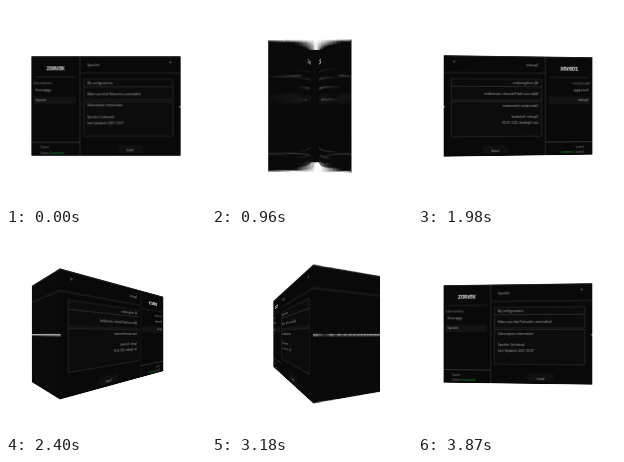
These frames come from a looping animation (200x200 px, 3900 ms). An HTML page:

```html
<!DOCTYPE html>
<html lang="en">
<head>
<meta charset="utf-8">
<title>Spinning panel</title>
<style>
  html, body { margin: 0; width: 100%; height: 100%; overflow: hidden; background: #fff; }
  .stage { position: relative; width: 200px; height: 200px; overflow: hidden; perspective: 171px; }
  .box {
    position: absolute; left: 25px; top: 50px; width: 150px; height: 100px;
    transform-style: preserve-3d;
    animation: spin 3900ms steps(130) infinite;
  }
  .layer { position: absolute; inset: 0; background: #090909; }
  .core { position: absolute; left: 49px; top: 8px; width: 52px; height: 84px; background: #090909; }
  svg { display: block; width: 150px; height: 100px; }
  text { font: 3.1px "Open Sans", Arial, sans-serif; fill: #b4b4b4; }
  .logo { font: 700 4.5px Inter, Arial, sans-serif; fill: #fff; text-anchor: middle; }
  .dim { fill: #858585; }
  .on { fill: #16b83a; }
  .line { stroke: #363636; stroke-width: .6; fill: none; }
  .card { stroke: #363636; stroke-width: .5; fill: #0c0c0c; }
  @keyframes spin { to { transform: rotateY(360deg); } }
</style>
</head>
<body>
<div class="stage">
  <div class="box">
    <div class="layer">
      <svg viewBox="25 50 150 100">
        <path class="line" d="M25 50.3H175M73.8 50V150M29 70.8H70M74 67H175"/>
        <path class="line" style="stroke:#505050" d="M25 136.6H73.8"/>
        <rect x="27" y="90.5" width="43" height="7.5" fill="#131313"/>
        <text class="logo" x="49.3" y="63.9">ZORVEK</text>
        <text class="dim" x="27" y="78" style="font-size:3px">Subscriptions</text>
        <text x="29" y="85.4">Homepage</text>
        <text x="29" y="95.4">Spoofer</text>
        <text class="dim" x="34" y="142.6" style="font-size:2.8px">Status:</text>
        <text class="dim" x="34" y="148.2" style="font-size:2.8px">Status: <tspan class="on">Connected</tspan></text>

        <text x="81" y="59.8" style="font-size:3.4px">Spoofer</text>
        <text x="163.5" y="56.6" style="font-size:4.2px">x</text>
        <rect class="card" x="77.5" y="73" width="90" height="7.5"/>
        <rect class="card" x="77.5" y="80.5" width="90" height="13.5"/>
        <rect class="card" x="77.5" y="95.5" width="90" height="35"/>
        <text x="81" y="77.7">My configurations</text>
        <text x="81" y="89">Make sure that Palisord is uninstalled</text>
        <text x="81" y="100.8">Subscription information</text>
        <text x="81" y="112.2">Spoofer: Unlimited</text>
        <text x="81" y="118.2">Last Updated: 2021.10.07</text>
        <rect x="112" y="139.5" width="25" height="8" fill="#101010"/>
        <text x="120.5" y="145.6">Load</text>
        <rect x="174" y="100.3" width="1" height="1" fill="#fff"/>
      </svg>
    </div>
  </div>
</div>
<script>
  // The solid is a dense stack of identical sheets.
  const COUNT = 81, HALF_DEPTH = 26.3, SCALE = 0.841;
  const box = document.querySelector('.box');
  const sheet = box.firstElementChild;

  for (let i = 0; i < COUNT; i++) {
    const layer = i ? sheet.cloneNode(true) : sheet;
    const z = HALF_DEPTH * (2 * i / (COUNT - 1) - 1);
    layer.style.transform = `translateZ(${z}px) scale(${SCALE})`;
    box.append(layer);
  }

  // Cross walls keep the stack opaque when it is seen edge-on.
  for (const x of [-44, 44]) {
    const wall = document.createElement('div');
    wall.className = 'core';
    wall.style.transform = `translateX(${x}px) rotateY(90deg)`;
    box.append(wall);
  }
</script>
</body>
</html>
```
